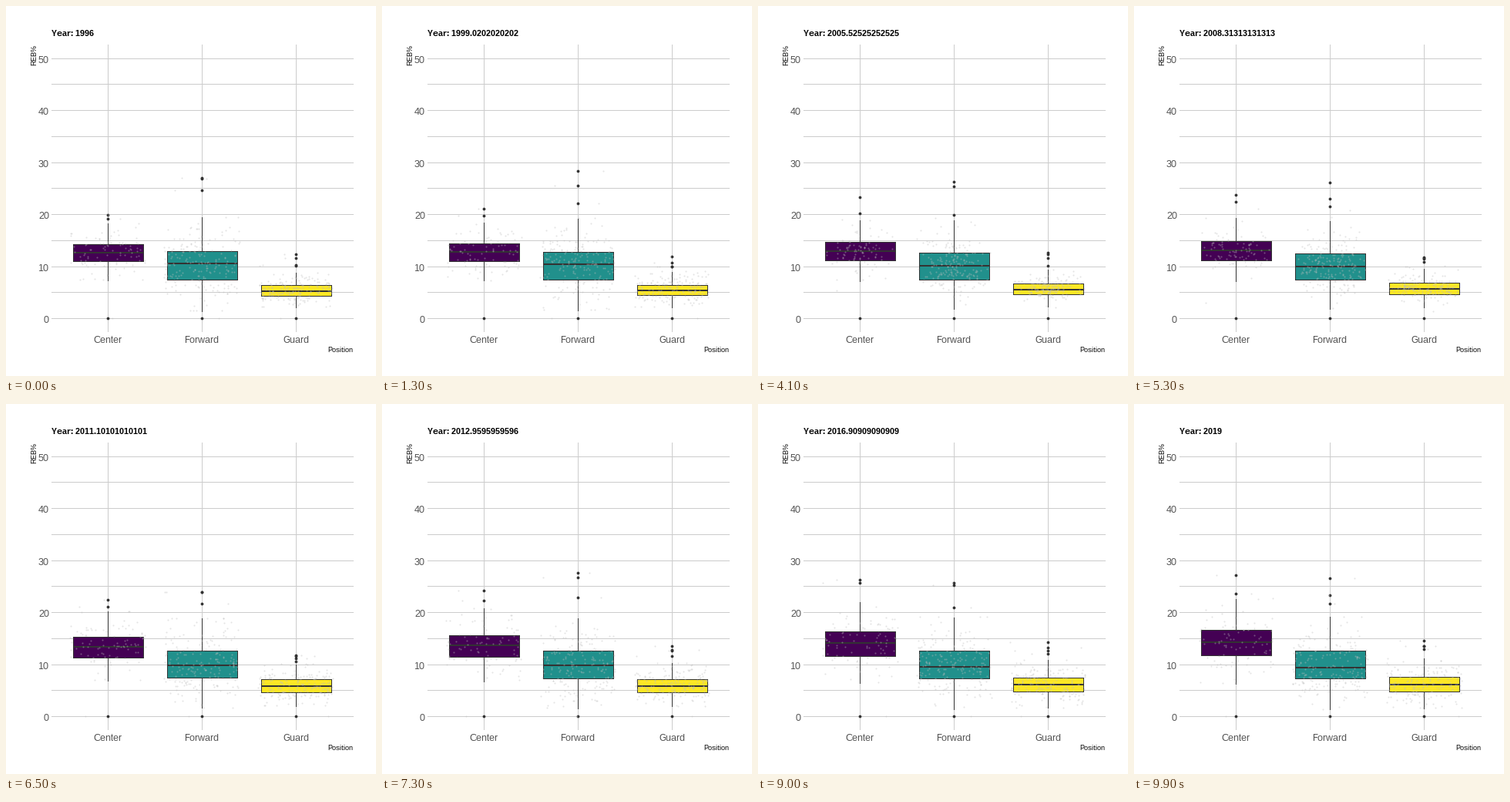
Write a matplotlib script that moves like this. It is 480 px wide and 480 px high and loops after 10000 ms.

```python
import numpy as np
import matplotlib.pyplot as plt
from matplotlib.animation import FuncAnimation
from matplotlib.patches import Rectangle

plt.rcParams["font.family"] = ["Liberation Sans", "DejaVu Sans"]
plt.rcParams["text.hinting"] = "native"
plt.rcParams["text.hinting_factor"] = 1

SIZE, DPI, FRAMES, YEARS = 480, 100, 100, 24
PX = 72 / DPI
INK, GRID, GREY = "#333333", "#cccccc", "#4d4d4d"
YEAR_KEYS = np.linspace(0, FRAMES - 1, YEARS).round()


def to_y(v):
    return 404.5 - 6.748 * np.asarray(v)


def snap(v):
    return np.floor(to_y(v)) + 1


def by_year(i, rows):
    """Linear tween between the rows of the two nearest years."""
    k = min(int(np.searchsorted(YEAR_KEYS, i, "right")) - 1, YEARS - 2)
    t = (i - YEAR_KEYS[k]) / (YEAR_KEYS[k + 1] - YEAR_KEYS[k])
    return rows[k] * (1 - t) + rows[k + 1] * t


fig = plt.figure(figsize=(SIZE / DPI, SIZE / DPI), dpi=DPI, facecolor="white")
ax = fig.add_axes([0, 0, 1, 1])
ax.set(xlim=(0, SIZE), ylim=(SIZE, 0))
ax.axis("off")


def line(x, y, color=INK, width=1, z=1):
    return ax.plot(x, y, color=color, lw=width * PX, zorder=z,
                   antialiased=False, solid_capstyle="butt")[0]


def points(size, z, color, alpha=1):
    return ax.plot([], [], "o", color=color, alpha=alpha, ms=size * PX,
                   mew=0, zorder=z)[0]


def label(x, y, text, size, **kw):
    return ax.text(x, y, text, fontsize=size * PX, va="baseline", **kw)


class Group:
    """A box plot with its cloud of samples.

    quartiles: (q1, median, q3) in the first, middle and last year
    tail, reach: number of high outliers and how far they go
    """

    def __init__(self, name, x, color, quartiles, tail, reach, count, seed):
        self.x = x
        rng = np.random.default_rng(seed)
        self.stats = self.make_stats(np.array(quartiles), tail, reach, rng)
        self.cloud = self.make_cloud(count, rng)

        line([x, x], [50, 422], GRID)
        label(x, 437, name, 12, color=GREY, ha="center")
        self.dots = points(3.8, 2, INK)
        self.whiskers = [line([], [], z=3) for _ in range(2)]
        self.box = Rectangle((x - 45, 0), 91, 1, fc=color, ec=INK,
                             lw=PX, zorder=4, antialiased=False)
        ax.add_patch(self.box)
        self.median = line([], [], width=2, z=5)
        self.jitter = points(2.1, 6, "#bebebe", 0.4)

    def make_stats(self, quartiles, tail, reach, rng):
        """Rows of low, q1, median, q3, high and outliers, one per year."""
        t = np.linspace(0, 1, YEARS)
        q1, med, q3 = (np.interp(t, [0, 0.5, 1], q) for q in quartiles.T)
        low = np.maximum(q1 - 1.1 * (q3 - q1), 0)
        high = q3 + 1.2 * (q3 - q1)
        far = np.sort(rng.uniform(0.1, 1, (YEARS, tail)), axis=1) * reach
        return np.column_stack([low, q1, med, q3, high, 0 * t,
                                high[:, None] + far])

    def make_cloud(self, n, rng):
        """Jittered samples that follow the box of each year."""
        years = []
        for row in self.stats:
            low, q1, med, q3, high = row[:5]
            z = rng.normal(size=n) / 0.674
            v = np.clip(med + z * np.where(z > 0, q3 - med, med - q1),
                        low, high)
            out = row[5:]
            v[rng.permutation(n)[:len(out)]] = out
            years.append([self.x + rng.uniform(-48.8, 48.8, n), to_y(v)])
        return np.array(years)

    def draw(self, i):
        row = by_year(i, self.stats)
        low, q1, med, q3, high = snap(row[:5])
        self.dots.set_data([self.x] * len(row[5:]), to_y(row[5:]))
        self.whiskers[0].set_data([self.x] * 2, [low, q1])
        self.whiskers[1].set_data([self.x] * 2, [q3, high])
        self.box.set_y(q3)
        self.box.set_height(q1 - q3)
        self.median.set_data([self.x - 45, self.x + 46], [med, med])
        self.jitter.set_data(*by_year(i, self.cloud))


for v in range(0, 51, 5):
    line([59, 450], [snap(v)] * 2, GRID)
    if v % 10 == 0:
        label(56, snap(v) + 6, str(v), 12, color=GREY, ha="right")

groups = [
    Group("Center", 132, "#440154",
          [(10.9, 12.6, 14.2), (11.1, 13, 14.7), (11.7, 14.25, 16.65)],
          tail=2, reach=5, count=95, seed=3),
    Group("Forward", 254, "#21908c",
          [(7.4, 10.45, 12.85), (7.4, 10, 12.5), (7.2, 9.4, 12.6)],
          tail=3, reach=9, count=200, seed=5),
    Group("Guard", 376, "#fde725",
          [(4.3, 5.25, 6.3), (4.6, 5.6, 6.8), (4.7, 6.1, 7.6)],
          tail=4, reach=3.5, count=180, seed=8),
]
title = label(59, 39, "", 11, weight="bold", color="black")
label(450, 449, "Position", 9, color="black", ha="right")
label(39, 50, "REB%", 9, color="black", ha="right", rotation=90,
      rotation_mode="anchor")


def update(i):
    title.set_text(f"Year: {1996 + 23 * i / (FRAMES - 1):.15g}")
    for g in groups:
        g.draw(i)
    return []


anim = FuncAnimation(fig, update, frames=FRAMES, interval=100, repeat=True,
                     repeat_delay=0)
plt.show()
```
